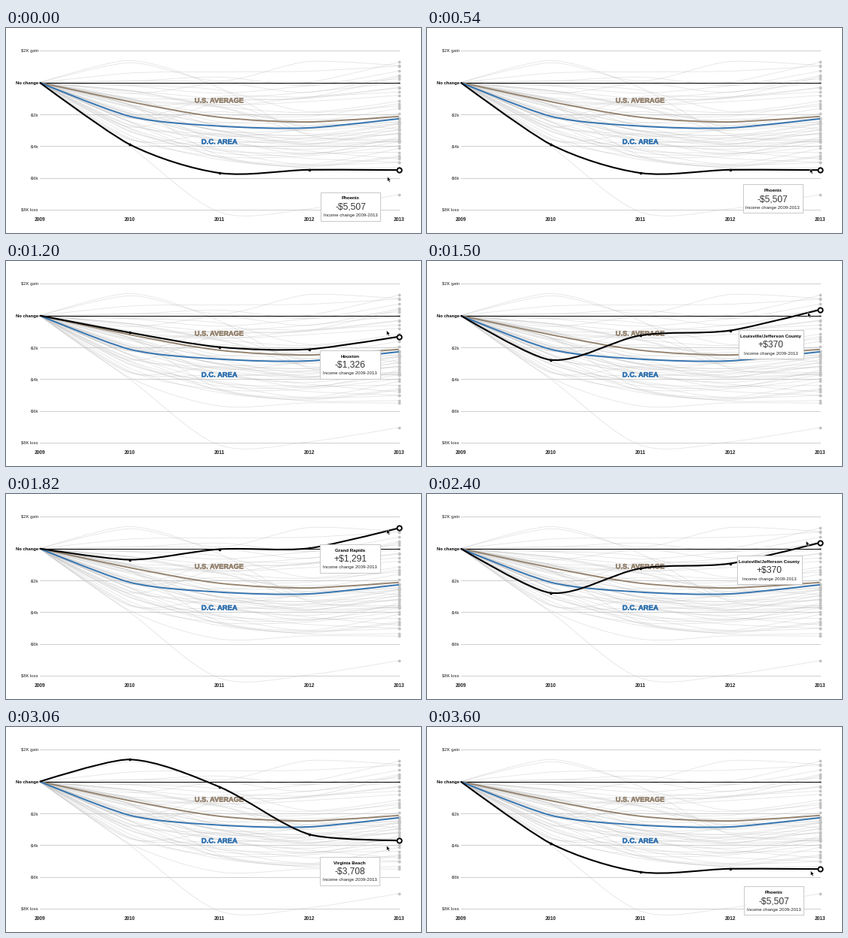
Recreate the animation shown at these times as a matplotlib script. Size 550 by 273 pixels, loop 4 s.

```python
import numpy as np
import matplotlib.pyplot as plt
from matplotlib.animation import FuncAnimation
from matplotlib.patches import PathPatch, Polygon, Rectangle
from matplotlib.path import Path
from matplotlib.patheffects import withStroke

W, H, DPI = 550, 273, 64
PT = 72 / DPI  # points per pixel
STEP = 20
FRAMES = 200
XS = 44.7 + 119 * np.arange(5)
TAN, BLUE = "#95836f", "#3273b0"
LAG = 40  # ms the tooltip trails the pointer

plt.rcParams["font.family"] = "Liberation Sans"
rng = np.random.default_rng(11)


def typical(end):
    """Plausible yearly values that finish at the given change."""
    first = np.clip(0.5 * end - 0.6 + rng.normal(0, 0.8), -4.0, 0.6)
    second = 0.4 * first + 0.6 * end - 0.6 + rng.normal(0, 0.5)
    third = 0.3 * second + 0.7 * end - 0.4 + rng.normal(0, 0.3)
    return first, second, third, end


# Income change in thousands of dollars, 2010 to 2013
CITIES = {
    "Phoenix": (-3.89, -5.69, -5.49, -5.507),
    "Providence": (-3.60, -3.22, -3.82, -3.688),
    "Houston": (-1.07, -1.98, -2.12, -1.326),
    "Grand Rapids": (-0.70, -0.04, 0.02, 1.291),
    "Louisville/Jefferson County": (-2.79, -1.25, -0.94, 0.370),
    "Virginia Beach": (1.39, -0.33, -3.32, -3.708),
    "Oakdale": typical(-5.004),
    "Riverton": typical(-4.612),
    "Fairview": typical(-2.483),
    "Ashford": typical(-0.297),
}

# Pointer: time in ms, x, y
PATH = np.array([
    (0, 505.5, 198), (540, 507.5, 187), (840, 508.7, 145),
    (1200, 504.5, 92.5), (1780, 505, 46), (2400, 502.5, 62.5),
    (3060, 504.5, 158), (3560, 508.5, 191.5),
])
ARROW = 0.9 * np.array([(0, 0), (0, 7), (1.6, 5.6), (2.8, 8.2),
                        (4.1, 7.6), (2.9, 5.1), (5, 5)])


def to_y(value):
    return 72.7 - 21.15 * np.asarray(value, float)


def curve(values):
    """Cardinal spline from zero through the yearly values."""
    p = np.column_stack([XS, to_y((0, *values))])
    t = 0.15 * (p[2:] - p[:-2])
    verts = [p[0], p[1] - t[0] * 2 / 3, p[1]]
    for i in (1, 2):
        verts += [p[i] + t[i - 1], p[i + 1] - t[i], p[i + 1]]
    verts += [p[3] + t[2] * 2 / 3, p[4]]
    codes = [Path.MOVETO] + [Path.CURVE3] * 2 + [Path.CURVE4] * 6 + [Path.CURVE3] * 2
    return Path(verts, codes)


def pointer_at(t):
    return np.array([np.interp(t, PATH[:, 0], col) for col in PATH[:, 1:].T])


fig = plt.figure(figsize=(W / DPI, H / DPI), dpi=DPI, facecolor="white")
ax = fig.add_axes([0, 0, 1, 1])
ax.set_xlim(0, W)
ax.set_ylim(H, 0)
ax.axis("off")


def label(x, y, text, size, color="#222222", weight="normal", ha="center", z=5):
    return ax.text(x, y, text, fontsize=size * PT, color=color, weight=weight,
                   ha=ha, va="center_baseline", zorder=z)


def heading(y, text, size, color):
    label(282.7, y, text, size, color, "bold").set_path_effects(
        [withStroke(linewidth=0.5 * PT, foreground=color)])


def line(values, color, width, z, alpha=1):
    return ax.add_patch(PathPatch(curve(values), fill=False, ec=color,
                                  lw=width * PT, alpha=alpha, zorder=z))


def dots(size, color, z, edge="none", edge_width=0):
    return ax.plot([], [], "o", ms=size * PT, mfc=color, mec=edge,
                   mew=edge_width * PT, zorder=z)[0]


# Scales
for value in range(-8, 3, 2):
    text = {2: "$2K gain", 0: "No change", -8: "$8K loss"}.get(value, f"-${-value}k")
    zero = value == 0
    ax.plot(XS[[0, -1]], [to_y(value)] * 2, lw=PT, zorder=3 if zero else 1,
            color="black" if zero else "#cfcfcf")
    label(42.8, to_y(value), text, 5.9, "black" if zero else "#222222",
          "bold" if zero else "normal", "right")
for x, year in zip(XS, range(2009, 2014)):
    label(x, 254.5, str(year), 6.5, "#222222", "bold")

# All cities in the background
ends = np.concatenate([np.linspace(1.0, -1.9, 12), np.linspace(-2.1, -3.9, 20),
                       np.linspace(-4.1, -5.3, 6)])
rows = list(CITIES.values()) + [typical(e) for e in rng.normal(ends, 0.06)]
rows += [(-4.0, -8.15, -7.95, -7.05), (1.25, 0.1, 1.33, 1.07)]
for row in rows:
    line(row, "#bdbdbd", 0.8, 2, alpha=0.42)
dots(3.8, "#c2c2c2", 2.5).set_data([XS[-1]] * len(rows),
                                   [to_y(row[-1]) for row in rows])

# Averages
line((-1.2, -2.18, -2.48, -2.13), TAN, 1.9, 4)
line((-2.12, -2.74, -2.85, -2.28), BLUE, 1.9, 4.1)
heading(96, "U.S. AVERAGE", 9.2, TAN)
heading(151, "D.C. AREA", 9.4, BLUE)

# Highlight, tooltip and pointer
CURVES = {name: curve(values) for name, values in CITIES.items()}
strong = line(CITIES["Phoenix"], "black", 2.1, 6)
knots = dots(3.6, "black", 6)
ring = dots(6.2, "white", 7, "black", 1.9)
box = ax.add_patch(Rectangle((0, 0), 80, 38, fc="white", ec="#c4c4c4",
                             lw=0.9 * PT, zorder=8))
title = label(0, 0, "", 6.1, "black", "bold", z=9)
amount = label(0, 0, "", 12, "#333333", z=9)
note = label(0, 0, "Income change 2009-2013", 6.05, "#222222", z=9)
pointer = ax.add_patch(Polygon(ARROW, fc="black", ec="white", lw=0.4 * PT,
                               zorder=10))


def update(frame):
    t = frame * STEP
    tip = pointer_at(t)
    # The city whose last dot is nearest the pointer lights up
    name = min(CITIES, key=lambda city: abs(to_y(CITIES[city][-1]) - tip[1]))
    values = CITIES[name]
    strong.set_path(CURVES[name])
    knots.set_data(XS[1:4], to_y(values[:3]))
    ring.set_data(XS[-1:], [to_y(values[-1])])

    cx, top = pointer_at(t - LAG) + (-49, 20.5)
    width = max(79.5, 2.85 * len(name) + 9)
    box.set_bounds(cx - width / 2, top, width, 38)
    title.set_text(name)
    amount.set_text(f"{'+' if values[-1] > 0 else '-'}${abs(values[-1]) * 1000:,.0f}")
    for text, dy in ((title, 8), (amount, 18.6), (note, 30.6)):
        text.set_position((cx, top + dy))
    pointer.set_xy(ARROW + tip)
    return strong, knots, ring, box, title, amount, note, pointer


anim = FuncAnimation(fig, update, frames=FRAMES, interval=STEP, repeat=True,
                     repeat_delay=0, blit=False)
plt.show()
```
